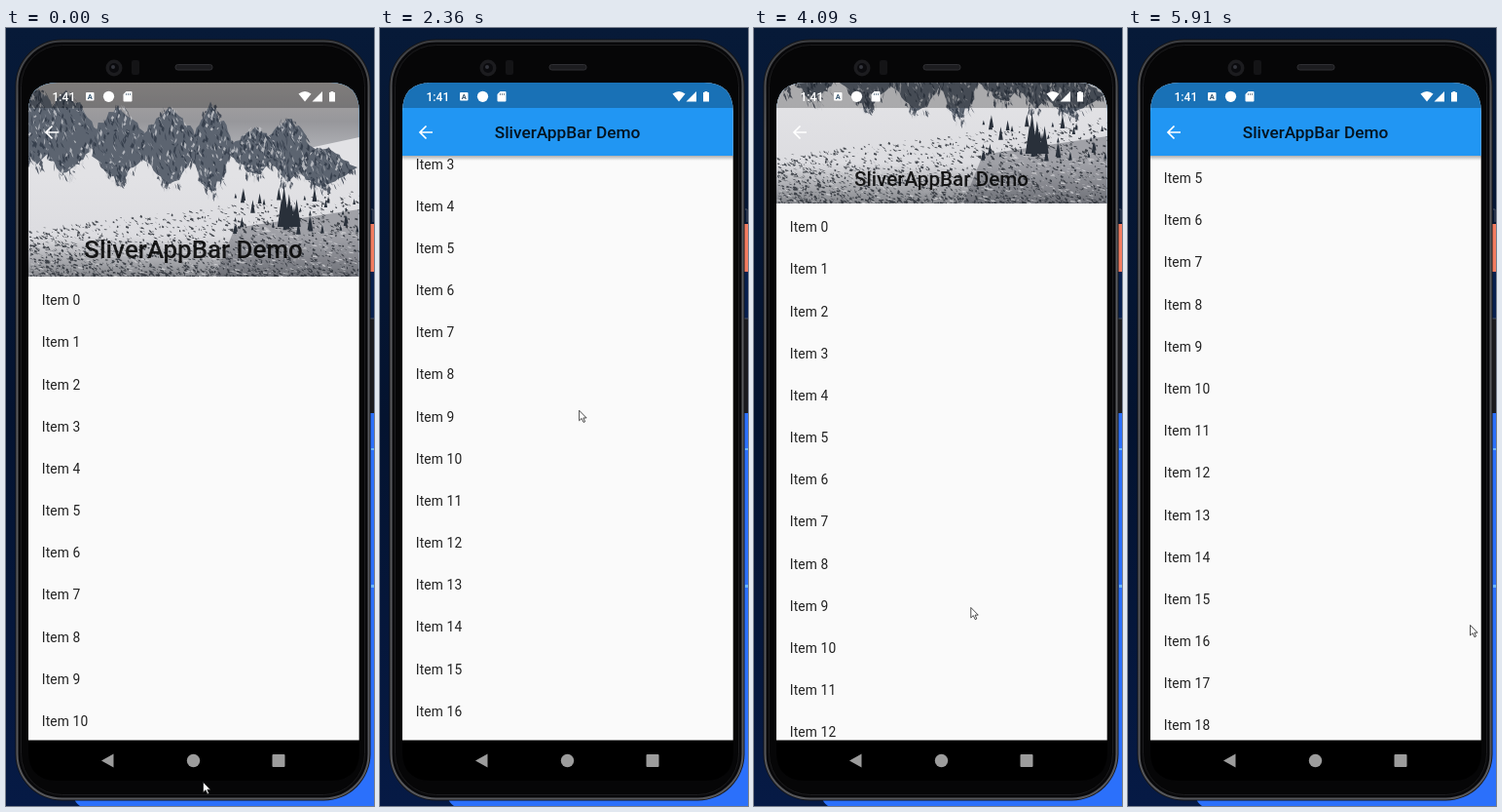
Write an HTML page that moves like this. It is 378x798 px and loops after 6000 ms.

```html
<!DOCTYPE html>
<html lang="en">
<head>
<meta charset="utf-8">
<title>SliverAppBar Demo</title>
<style>
  html, body { margin: 0; width: 100%; height: 100%; overflow: hidden; background: #061530; }
  svg { display: block; width: 100vw; height: 100vh; }
  text { font-family: Roboto, "Noto Sans", sans-serif; }
</style>
</head>
<body>
<svg viewBox="0 0 378 798" preserveAspectRatio="none">
  <defs>
    <linearGradient id="desk" x2="0" y2="1">
      <stop offset="0" stop-color="#071a38"/><stop offset=".5" stop-color="#04132f"/><stop offset="1" stop-color="#061a45"/>
    </linearGradient>
    <linearGradient id="rim" x2="0" y2="1">
      <stop offset="0" stop-color="#3c3d40"/><stop offset=".12" stop-color="#5d5e61"/><stop offset="1" stop-color="#55565a"/>
    </linearGradient>
    <linearGradient id="sky" x2="0" y2="1">
      <stop offset="0" stop-color="#aaa6a4"/><stop offset=".2" stop-color="#97979b"/><stop offset=".4" stop-color="#b9bbc0"/>
    </linearGradient>
    <linearGradient id="ground" x2="0" y2="1">
      <stop offset=".3" stop-color="#e2e2e5"/><stop offset=".72" stop-color="#dcdce0"/><stop offset="1" stop-color="#85878c"/>
    </linearGradient>
    <linearGradient id="shade" x2="0" y2="1">
      <stop offset="0" stop-color="#000" stop-opacity=".3"/><stop offset="1" stop-color="#000" stop-opacity="0"/>
    </linearGradient>
    <clipPath id="screen"><path d="M23 730.500V86Q23 56 53 56H333Q362.700 56 362.700 86V730.500Z"/></clipPath>
    <clipPath id="headClip"><rect id="headBox" x="23" y="56" width="340" height="199"/></clipPath>
  </defs>

  <!-- desktop -->
  <rect width="378" height="798" fill="url(#desk)"/>
  <path d="M330 395H378V798H76Q71 795 68 786H330Z" fill="#2b70fb"/>
  <path d="M375 571h3v3h-3zM375 431h3v2h-3z" fill="#69b6ff"/>
  <rect x="374" y="201" width="4" height="49" fill="#f27c60"/>
  <rect x="374" y="250" width="4" height="48" fill="#08204e"/>
  <rect x="374" y="298" width="4" height="97" fill="#1b1b1f"/>
  <path d="M374 298h4M375 186h2v13" stroke="#4a5263" fill="none"/>

  <!-- phone body -->
  <rect x="9.500" y="11.500" width="365" height="781" rx="48" fill="#151517"/>
  <rect x="11.500" y="13.500" width="361" height="777" rx="46" fill="#08080a" stroke="url(#rim)" stroke-width="2"/>
  <rect x="15.500" y="17.500" width="353" height="769" rx="42" fill="#060607" stroke="#1c1c1e"/>
  <path d="M23 725h340v17q0 30-30 30H53q-30 0-30-30z" fill="#000"/>
  <circle cx="111" cy="41" r="8.500" fill="#1c1c1f"/>
  <circle cx="111" cy="41" r="5" fill="#0b0b0e"/>
  <circle cx="110" cy="40" r="2" fill="#34363d"/>
  <rect x="129" y="33" width="8" height="15" rx="2" fill="#141416"/>
  <rect x="174" y="37.500" width="38" height="5.500" rx="2.500" fill="#1c1c1f" stroke="#303034"/>
  <g fill="#9c9c9c">
    <path d="M98 751.500 110.500 744.500V758.500Z"/>
    <circle cx="192.500" cy="751.500" r="6.700"/>
    <rect x="273.500" y="745" width="13" height="13" rx="1"/>
  </g>

  <g clip-path="url(#screen)">
    <rect x="23" y="56" width="340" height="675" fill="#fafafa"/>
    <g id="list" font-size="13.800" letter-spacing=".13" fill="#000" fill-opacity=".87"></g>
    <rect id="shadow" x="23" y="131" width="340" height="5" fill="url(#shade)"/>
    <g clip-path="url(#headClip)">
      <rect x="23" y="56" width="340" height="199" fill="#2196f3"/>
      <g id="photo">
        <rect x="23" y="56" width="340" height="199" fill="url(#sky)"/>
        <path d="M23 112 190 108 270 132 363 112V255H23Z" fill="url(#ground)"/>
        <path id="rocks" fill="#5c6470"/>
        <path id="cracks" fill="#2f3845" fill-opacity=".8"/>
        <path id="snow" fill="#d0d2d6" fill-opacity=".75"/>
        <path d="M215 255 235 205 363 186V255Z" fill="#54585f" fill-opacity=".45"/>
        <path id="scrub" fill="#2b3037" fill-opacity=".85"/>
        <path id="patches" fill="#e0e0e3" fill-opacity=".7"/>
        <path id="trees" fill="#29303a"/>
      </g>
      <text id="title" text-anchor="middle" font-size="17.270" font-weight="500" fill="#000" fill-opacity=".87">SliverAppBar Demo</text>
      <path d="M54 107H41.500M47.500 100.500 41 107 47.500 113.500" fill="none" stroke="#fff" stroke-width="1.700"/>
    </g>
    <rect x="23" y="56" width="340" height="26" fill="#000" fill-opacity=".25"/>
    <g fill="#fff">
      <text x="47.500" y="75" font-size="12.100" font-weight="500">1:41</text>
      <rect x="82" y="66" width="8.500" height="8.500" rx="1"/>
      <text x="86.250" y="73" font-size="7.500" font-weight="700" text-anchor="middle" fill="#33546f">A</text>
      <circle cx="105.500" cy="70.300" r="5.600"/>
      <path d="M123.500 65H128.500Q129.500 65 129.500 66V74.500Q129.500 75.500 128.500 75.500H121.500Q120.500 75.500 120.500 74.500V68Z"/>
      <path d="M123.500 67v2M125.500 67v2M127.500 67v2" stroke="#5b7185" stroke-width=".8"/>
      <path d="M300.500 67.500Q307 62.500 313.500 67.500L307 75.500Z"/>
      <path d="M325 65V75.500H314.500Z"/>
      <path d="M333.500 65h2.800v1h1.700v9.500h-6V66h1.500z"/>
    </g>
  </g>

  <path id="cursor" d="M.5 .5V11L3 8.700 4.900 12.700 6.500 12 4.800 8.200H8Z" fill="#fff" stroke="#222" stroke-width=".8"/>
</svg>

<script>
const LOOP = 6000, STEPS = 66, RANGE = 124, ROW = 43.17;
const $ = id => document.getElementById(id);

// Softened 0..1 glide between two steps
function glide(step, from, to) {
  const u = Math.min(1, Math.max(0, (step - from) / (to - from)));
  return 0.25 * u + 0.75 * u * u * (3 - 2 * u);
}

// Three drags: up, back down, up again
function scrollAt(step) {
  return 312.5 * glide(step, 6, 22) - 312.5 * glide(step, 24, 33.5) + 341 * glide(step, 39, 60);
}

// The pointer holds the list while dragging and drifts a little between drags
function cursorAt(step, scroll) {
  const enter = glide(step, 0, 4), leave = glide(step, 62, 65);
  const arc = Math.sin(Math.PI * enter);
  const x = 202 + 10 * enter + 50 * arc - 10 * glide(step, 6, 22) + 9 * glide(step, 23, 33)
    + 31 * glide(step, 39, 54) + 109 * leave;
  const y = 640.5 + 132.5 * (1 - enter) - 110 * arc - scroll + 20.5 * glide(step, 23, 25)
    + 20 * glide(step, 33, 38) - 12 * glide(step, 39, 41) + 12 * glide(step, 57, 60) + 272 * leave;
  return [x, y];
}

function seeded(seed) {
  return () => (seed = (seed * 16807) % 2147483647) / 2147483647;
}

// One path made of many small slivers; place() gives [x, y, width, height, lean]
function slivers(id, count, place) {
  let d = "";
  for (let i = 0; i < count; i++) {
    const [x, y, w, h, lean] = place();
    d += `M${x} ${y}l${w} ${h * 0.4} ${lean} ${h * 0.6} ${-w} ${-h * 0.3}z`;
  }
  $(id).setAttribute("d", d);
}

function buildPhoto() {
  const r = seeded(71);
  // Centre x, top, half width, base
  const massifs = [
    [32, 62, 34, 142], [62, 64, 34, 152], [115, 78, 32, 160], [168, 80, 34, 164],
    [210, 78, 26, 170], [256, 101, 28, 152], [289, 91, 28, 158], [325, 122, 34, 164]
  ];
  const outline = ([x, top, half, base]) => {
    const points = Array.from({ length: 36 }, (_, i) => {
      const a = i / 18 * Math.PI, c = Math.cos(a), s = Math.sin(a);
      const reach = (0.88 + 0.2 * r()) / (Math.abs(c) + Math.abs(s)) ** 0.75;
      return `${x + half * c * reach} ${(top + base) / 2 + (base - top) / 2 * s * reach}`;
    });
    return `M${points.join("L")}Z`;
  };
  $("rocks").setAttribute("d", massifs.map(outline).join(""));

  const onRock = (w, h) => () => {
    const [x, top, half, base] = massifs[Math.floor(r() * massifs.length)];
    const v = r(), spread = 1 - 0.8 * Math.abs(2 * v - 1);
    return [x + half * spread * (2 * r() - 1), top + v * (base - top), r() * w, 2 + r() * h, r() * 5 - 2];
  };
  slivers("cracks", 900, onRock(2.6, 8));
  slivers("snow", 650, onRock(2, 6));
  slivers("scrub", 1900, () => {
    const x = 23 + r() * 340, rise = 50 + 40 * (x - 23) / 340;
    return [x, 255 - rise * r() ** 1.6, 0.6 + r() * 2.4, 0.8 + r() * 2.6, r() * 3 - 1];
  });
  slivers("patches", 420, () => [23 + r() * 335, 200 + r() * 54, 1 + r() * 4, 0.6 + r() * 1.8, r() * 2]);

  let d = "";
  for (let i = 0; i < 44; i++) {
    const tall = i < 7, x = tall ? 283 + i * 2.6 : 225 + r() * 136;
    const base = tall ? 204 : 172 + r() * 40, h = tall ? 18 + r() * 24 : 4 + r() * 11;
    const w = h * 0.12 + 0.7;
    d += `M${x} ${base - h}L${x + w} ${base}H${x - w}Z`;
  }
  $("trees").setAttribute("d", d);
}

function buildList() {
  let rows = "";
  for (let i = 0; i < 20; i++) rows += `<text x="36.8" y="${284.3 + i * ROW}">Item ${i}</text>`;
  $("list").innerHTML = rows;
}

function place(id, x, y, scale = 1) {
  $(id).setAttribute("transform", `translate(${x} ${y}) scale(${scale})`);
}

function draw(time) {
  // The picture advances in discrete steps of about 91 ms
  const step = Math.floor((time % LOOP) / LOOP * STEPS + 0.1) % STEPS;
  const scroll = scrollAt(step);
  const fold = Math.min(1, scroll / RANGE);
  const bottom = 255 - fold * RANGE;
  const scale = 1.5 - 0.5 * fold;

  place("list", 0, -scroll);
  place("photo", 0, -fold * RANGE);
  place("title", 192.5, bottom - 18 - (scale - 1) * 2, scale);
  place("cursor", ...cursorAt(step, scroll));
  $("headBox").setAttribute("height", bottom - 56);
  $("shadow").setAttribute("opacity", fold === 1 ? 1 : 0);
  $("photo").setAttribute("opacity", Math.min(1, (1 - fold) / 0.39));
}

buildPhoto();
buildList();

const start = performance.now();
function tick() {
  draw(performance.now() - start);
  requestAnimationFrame(tick);
}
tick();
</script>
</body>
</html>
```
